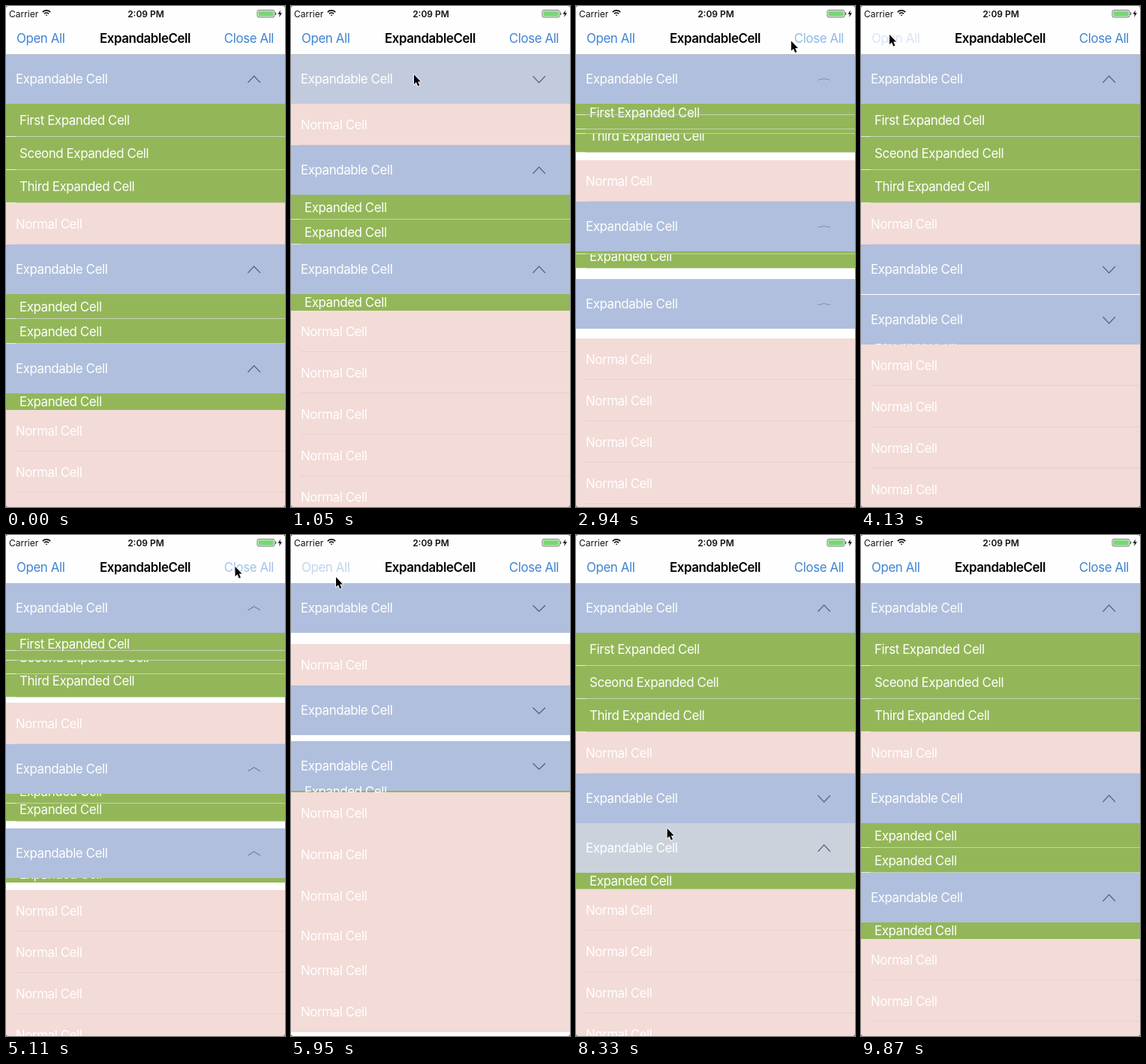
Recreate the animation shown at these times as an HTML page with a canvas. Size 372 by 666 pixels, loop 9.94 s.

```html
<!DOCTYPE html>
<html lang="en">
<head>
<meta charset="utf-8">
<style>
  html, body { margin: 0; width: 100%; height: 100%; overflow: hidden; background: #666; }
  canvas { display: block; width: 372px; height: 666px; border-radius: 3px; }
</style>
</head>
<body>
<canvas id="stage" width="372" height="666"></canvas>
<script>
const ctx = document.getElementById('stage').getContext('2d');
const W = 372, H = 666, LOOP = 9940, STEP = 70, SLIDE = 300;
const BLUE = '#b0bfdd', GREEN = '#93b758', PINK = '#f3dbd7', LINK = '#3f84d3';
const HEADER = 66, NORMAL = 55;

const groups = [
  { height: 44, labels: ['First Expanded Cell', 'Sceond Expanded Cell', 'Third Expanded Cell'] },
  { height: 33, labels: ['Expanded Cell', 'Expanded Cell'] },
  { height: 22, labels: ['Expanded Cell'] }
];

// Time of each tap, what is tapped, and which groups are open afterwards.
const taps = [
  [0, '', '111'], [650, 0, '011'], [1720, 0, '111'], [2803, 'close', '000'],
  [3450, 0, '100'], [4106, 'open', '111'], [5000, 'close', '000'],
  [5884, 'open', '111'], [6600, 1, '101'], [7245, 2, '100'],
  [8050, 2, '101'], [8650, 1, '111']
];

// Pointer stops: time, x, y.
const pointer = [
  [150, -14, 150], [550, 164, 91], [2050, 164, 91], [2600, 302, 43], [2800, 300, 43],
  [2940, 287, 46.5], [3350, 150, 92], [3600, 145, 92], [4000, 38, 38], [4200, 38, 38],
  [4800, 312, 42], [5050, 312, 42], [5650, 48, 42], [5870, 50, 44], [5950, 60, 56],
  [6450, 125, 345], [6700, 125, 345], [7050, 119, 434], [8150, 119, 434],
  [8500, 124, 350], [8850, 124, 350], [9450, -14, 400]
];

const clamp = v => Math.max(0, Math.min(1, v));
const ease = v => (1 - Math.cos(Math.PI * clamp(v))) / 2;

function rect(color, x, y, w, h) {
  ctx.fillStyle = color;
  ctx.fillRect(x, y, w, h);
}

function text(str, x, y, { color = '#fff', size = 16.86, weight = 400, spacing = -0.4, align = 'left' } = {}) {
  ctx.font = `${weight} ${size}px Inter, sans-serif`;
  ctx.letterSpacing = spacing + 'px';
  ctx.textAlign = align;
  ctx.fillStyle = color;
  ctx.fillText(str, x, y + size * 0.363);
}

function path(points, close) {
  ctx.beginPath();
  points.forEach(([x, y]) => ctx.lineTo(x, y));
  if (close) ctx.closePath();
}

function groupState(g, t) {
  let start = -SLIDE, open = true;
  for (const [time, , states] of taps) {
    const next = states[g] === '1';
    if (time <= t && next !== open) { start = time; open = next; }
  }
  const k = ease((t - start) / SLIDE);
  return { open, amount: open ? k : 1 - k };
}

function highlight(g, t) {
  let level = 0;
  for (const [time, target] of taps) {
    const age = t - time;
    if (target === g && age > -80) level = clamp((600 - age) / 500);
  }
  return level;
}

function buttonAlpha(name, t) {
  let alpha = 1;
  for (const [time, target] of taps) {
    if (target === name && t > time - 120) alpha = 0.2 + 0.8 * clamp((t - time - 30) / 230);
  }
  return alpha;
}

function drawHeader(g, y, amount, t) {
  rect(BLUE, 0, y, W, HEADER);
  rect(`rgba(221,221,221,${highlight(g, t)})`, 0, y, W, HEADER);
  text('Expandable Cell', 13, y + 33);
  // The arrow flips about its horizontal axis and thins out edge-on.
  const flip = Math.cos(Math.PI * amount), mid = y + 33.5;
  path([[322.5, mid - 4.3 * flip], [330.7, mid + 4.3 * flip], [339, mid - 4.3 * flip]]);
  ctx.strokeStyle = '#4b5a7b';
  ctx.lineWidth = 0.3 + 0.9 * Math.abs(flip);
  ctx.stroke();
}

function rowLine(y) {
  rect('rgba(255,255,255,.75)', 0, y - 1, 13, 1);
  rect('rgba(215,218,212,.75)', 13, y - 1, W - 13, 1);
}

function drawRows(g, top, { open, amount }) {
  const { height, labels } = groups[g], n = labels.length;
  const opening = open && amount < 1, rising = opening && n === 1;
  const overlap = rising ? Math.min(7, 60 * amount) : 0;
  ctx.save();
  ctx.beginPath();
  ctx.rect(0, top - overlap, W, n * height * amount + overlap);
  ctx.clip();
  for (let i = n - 1; i >= 0; i--) {
    let travel = height * (i + 1 + (4 - n) / 2);
    if (g === 0 && i === 0 && !opening) travel = 22;
    if (rising) travel = 11;
    const y = Math.round(top + i * height - travel * (1 - amount));
    const visibleTop = Math.max(y, top);
    rect(GREEN, 0, visibleTop, W, Math.max(0, y + height - visibleTop));
    text(labels[i], 18, y + height / 2);
    if (n > 1) rowLine(y + height);
  }
  if (g === 0 && amount < 1) rowLine(Math.round(top + height - 66 * (1 - amount)));
  ctx.restore();
}

function drawNormal(y, lined = true) {
  rect(PINK, 0, y, W, NORMAL);
  if (lined) rect('rgba(200,190,192,.35)', 13, y + NORMAL - 1, W - 13, 1);
  text('Normal Cell', 13, y + 27.5);
}

function drawTable(t) {
  const states = groups.map((_, g) => groupState(g, t));
  const allOpening = states.every(s => s.open && s.amount < 1);
  let y = 64, moved = 0;
  states.forEach((state, g) => {
    const top = Math.round(y), size = groups[g].height * groups[g].labels.length * state.amount;
    drawHeader(g, top, state.amount, t);
    if (state.amount > 0) drawRows(g, top + HEADER, state);
    y += HEADER + size;
    moved += size;
    if (g === 0) {
      drawNormal(Math.round(y), !allOpening);
      y += NORMAL;
    }
  });
  // Cells pushed off the bottom trail behind the others.
  for (let i = 0; i < (allOpening ? 6 : 8); i++) {
    const lag = allOpening ? moved * (i > 3 ? 0.44 : i === 3 ? 0.1 : 0) : 0;
    drawNormal(Math.round(y + i * NORMAL - lag), !allOpening);
  }
}

function drawBars(t) {
  rect('#fefefe', 0, 0, W, 64);
  rect('#b9bdc4', 0, 64, W, 0.7);
  const status = { color: '#111', size: 12, spacing: 0 };
  text('Carrier', 4, 10.5, status);
  text('2:09 PM', 186.5, 10.5, { ...status, weight: 600, align: 'center' });

  ctx.strokeStyle = '#111';
  ctx.lineWidth = 1.6;
  for (const r of [1, 4.2, 7.4]) {
    ctx.beginPath();
    ctx.arc(54, 13.3, r, -Math.PI * 0.75, -Math.PI * 0.25);
    ctx.stroke();
  }
  ctx.lineWidth = 0.8;
  ctx.strokeStyle = '#555';
  ctx.beginPath();
  ctx.roundRect(335, 5.5, 23, 9.5, 2);
  ctx.stroke();
  rect('#78d775', 336.4, 6.8, 20.2, 6.9);
  rect('#555', 359, 8.5, 1.2, 3.5);
  path([[366, 5.5], [362.5, 10.8], [365, 10.8], [364, 15], [368, 9.3], [365.4, 9.3]], true);
  ctx.fillStyle = '#111';
  ctx.fill();

  text('ExpandableCell', 185.5, 42.5, { color: '#000', weight: 600, align: 'center' });
  ctx.globalAlpha = buttonAlpha('open', t);
  text('Open All', 14, 42.5, { color: LINK });
  ctx.globalAlpha = buttonAlpha('close', t);
  text('Close All', 357, 42.5, { color: LINK, align: 'right' });
  ctx.globalAlpha = 1;
}

function drawPointer(t) {
  const i = pointer.findIndex(p => p[0] > t);
  if (i < 1) return;
  const [t0, x0, y0] = pointer[i - 1], [t1, x1, y1] = pointer[i];
  const k = ease((t - t0) / (t1 - t0));
  ctx.save();
  ctx.translate(x0 + (x1 - x0) * k, y0 + (y1 - y0) * k);
  path([[0, 0], [0, 13], [3, 10.3], [5.2, 15.5], [7.4, 14.5], [5.2, 9.6], [9, 9.4]], true);
  ctx.lineJoin = 'round';
  ctx.lineWidth = 1.8;
  ctx.strokeStyle = '#fff';
  ctx.stroke();
  ctx.fillStyle = '#000';
  ctx.fill();
  ctx.restore();
}

function render(now) {
  const t = Math.floor((now % LOOP) / STEP) * STEP;
  rect('#fff', 0, 0, W, H);
  drawTable(t);
  drawBars(t);
  drawPointer(t);
  requestAnimationFrame(() => render(performance.now()));
}
render(0);
</script>
</body>
</html>
```
